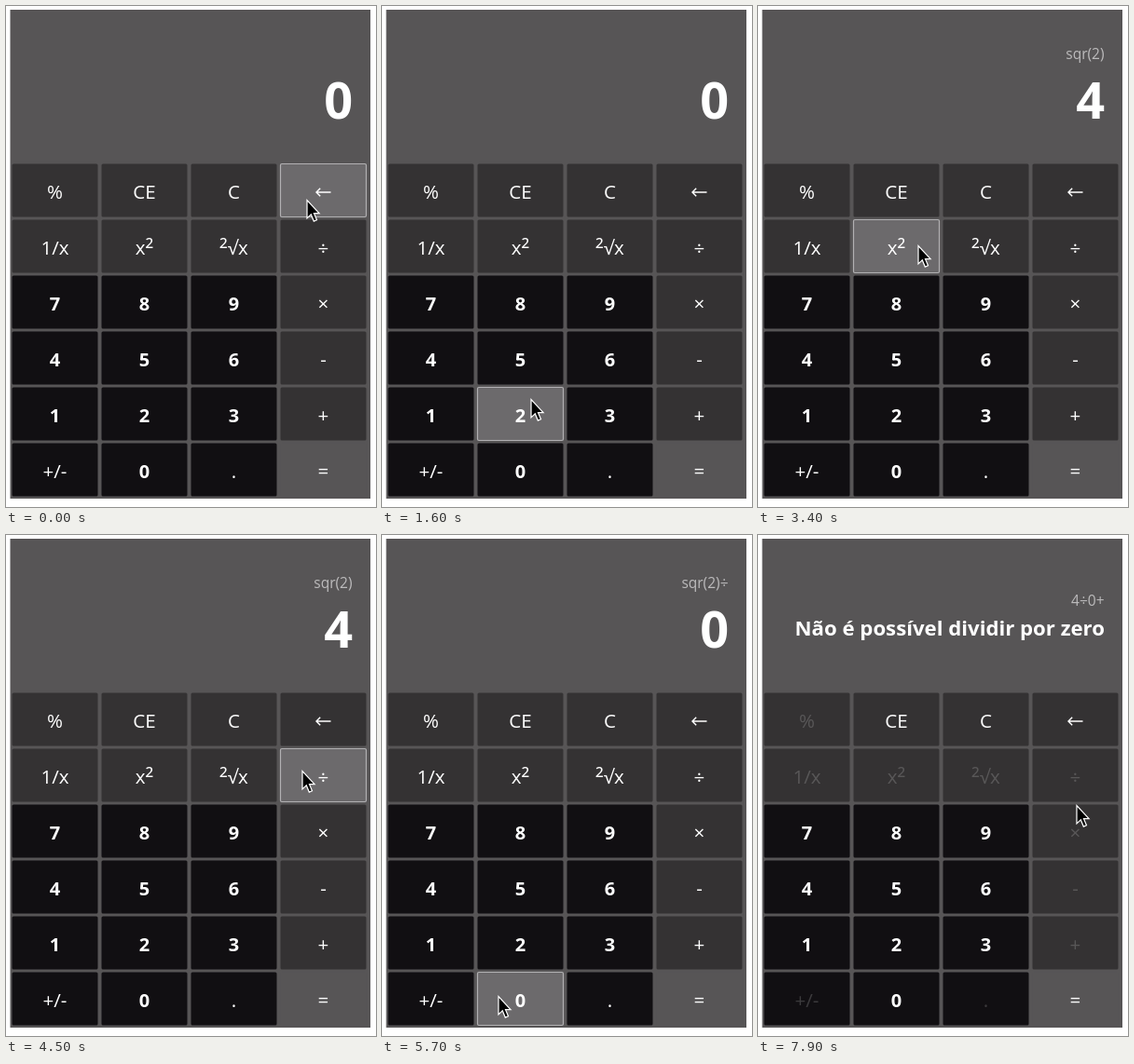
An HTML page that plays this animation: 397 px wide and 538 px high, repeating every 8000 ms.

```html
<!DOCTYPE html>
<html lang="pt">
<head>
<meta charset="utf-8">
<title>Calculadora</title>
<style>
  html, body { margin: 0; width: 100%; height: 100%; overflow: hidden; background: #fff; }
  svg { display: block; }
  text { font-family: "Open Sans", "Noto Sans", "DejaVu Sans", sans-serif; fill: #fff; }
  .key text { font-size: 20.6px; text-anchor: middle; }
  .key tspan { font-size: 25px; }
  .key rect { fill: #343233; }
  .key path { fill: none; stroke: #fff; stroke-width: 1.4; }
  .key.digit text { font-size: 20px; font-weight: 700; }
  .dark rect { fill: #110f12; }
  .equal rect { fill: #575556; }
  .hover rect { fill: #6c6a6c; stroke: #b2b1b3; stroke-width: 1.2; }
  .off text { fill-opacity: .18; }
  #value, #history { text-anchor: end; }
  #value { font-weight: 700; font-size: 54px; }
  #history { font-size: 15.5px; fill: #bcbbbc; }
  .error #value { font-size: 22.2px; }
</style>
</head>
<body>
<svg id="stage" width="397" height="538" viewBox="0 0 397 538">
  <rect x="4.5" y="4" width="386.5" height="525" fill="#575556"/>
  <text id="history" x="371.5"></text>
  <text id="value" x="372"></text>
  <g id="keys"></g>
  <path id="cursor" d="M1 1.6V20.9L5.3 16.9L8.3 24.1L11.5 22.7L8.5 15.7H14.1Z" fill="#000" stroke="#fff" stroke-width="1.2"/>
</svg>
<script>
const LOOP = 8000, STEP = 100;
const ROWS = ["% CE C ←", "1/x x² ²√x ÷", "7 8 9 ×", "4 5 6 -", "1 2 3 +", "+/- 0 . ="];

// Each stop of the pointer, and what the display shows after its click
const STOPS = [
  { arrive: 0, leave: 900, x: 322, y: 207, click: 0, past: "", shown: "0" },
  { arrive: 1600, leave: 1900, x: 159, y: 421, click: 1800, past: "", shown: "2" },
  { arrive: 2600, leave: 3600, x: 171, y: 256, click: 2800, past: "sqr(2)", shown: "4" },
  { arrive: 4400, leave: 4700, x: 317, y: 252, click: 4700, past: "sqr(2)÷", shown: "4" },
  { arrive: 5400, leave: 5700, x: 124, y: 494, click: 5600, past: "sqr(2)÷", shown: "0" },
  { arrive: 6400, leave: 7700, x: 344, y: 443, click: 6900, past: "4÷0+", shown: "Não é possível dividir por zero" },
  { arrive: 7900, leave: LOOP, x: 341, y: 289, click: LOOP }
];

const $ = id => document.getElementById(id);
const stage = $("stage"), value = $("value"), past = $("history"), cursor = $("cursor");

function add(parent, tag, attrs = {}) {
  const el = document.createElementNS("http://www.w3.org/2000/svg", tag);
  for (const name in attrs) el.setAttribute(name, attrs[name]);
  return parent.appendChild(el);
}

function addLabel(g, label, x, y) {
  if (label === "←") {
    add(g, "path", { d: `M${x + 8} ${y - 7}h-15.5m4.2-4.2l-4.2 4.2l4.2 4.2` });
    return;
  }
  const text = add(g, "text", { x, y });
  for (const part of label.split(/(²)/)) {
    if (part === "²") add(text, "tspan").textContent = part;
    else text.append(part);
  }
}

const keys = ROWS.flatMap((row, r) => row.split(" ").map((label, c) => {
  const x = 6.5 + 96 * c, y = 169.5 + 60 * r;
  const digit = /^\d$/.test(label);
  const g = add($("keys"), "g");
  add(g, "rect", { x, y, width: 92, height: 57, rx: 1.5 });
  addLabel(g, label, x + 46, y + 37.5);
  const base = "key" + (digit ? " digit" : "") + (r > 1 && c < 3 ? " dark" : "") + (label === "=" ? " equal" : "");
  return { g, x, y, base, locks: !digit && !["CE", "C", "←", "="].includes(label) };
}));

function pointer(t) {
  const i = STOPS.findLastIndex(s => s.arrive <= t);
  const from = STOPS[i], to = STOPS[i + 1] || from;
  if (t <= from.leave) return [from.x, from.y];
  const u = (t - from.leave) / (to.arrive - from.leave), k = u * u * (3 - 2 * u);
  return [from.x + (to.x - from.x) * k, from.y + (to.y - from.y) * k].map(Math.round);
}

function draw(t) {
  const [px, py] = pointer(t);
  const screen = STOPS.findLast(s => s.click <= t);
  const error = screen.shown.length > 1;
  stage.setAttribute("class", error ? "error" : "");
  past.textContent = screen.past;
  past.setAttribute("y", error ? 76 : 57);
  value.textContent = screen.shown;
  value.setAttribute("y", error ? 108 : 121);
  for (const k of keys) {
    const over = px >= k.x && px < k.x + 92 && py >= k.y && py < k.y + 57;
    const off = error && k.locks;
    k.g.setAttribute("class", k.base + (off ? " off" : over ? " hover" : ""));
  }
  cursor.setAttribute("transform", `translate(${px} ${py})`);
}

const start = performance.now();
function tick() {
  const t = (performance.now() - start) % LOOP;
  draw(Math.floor(t / STEP) * STEP);
  requestAnimationFrame(tick);
}
tick();
</script>
</body>
</html>
```
